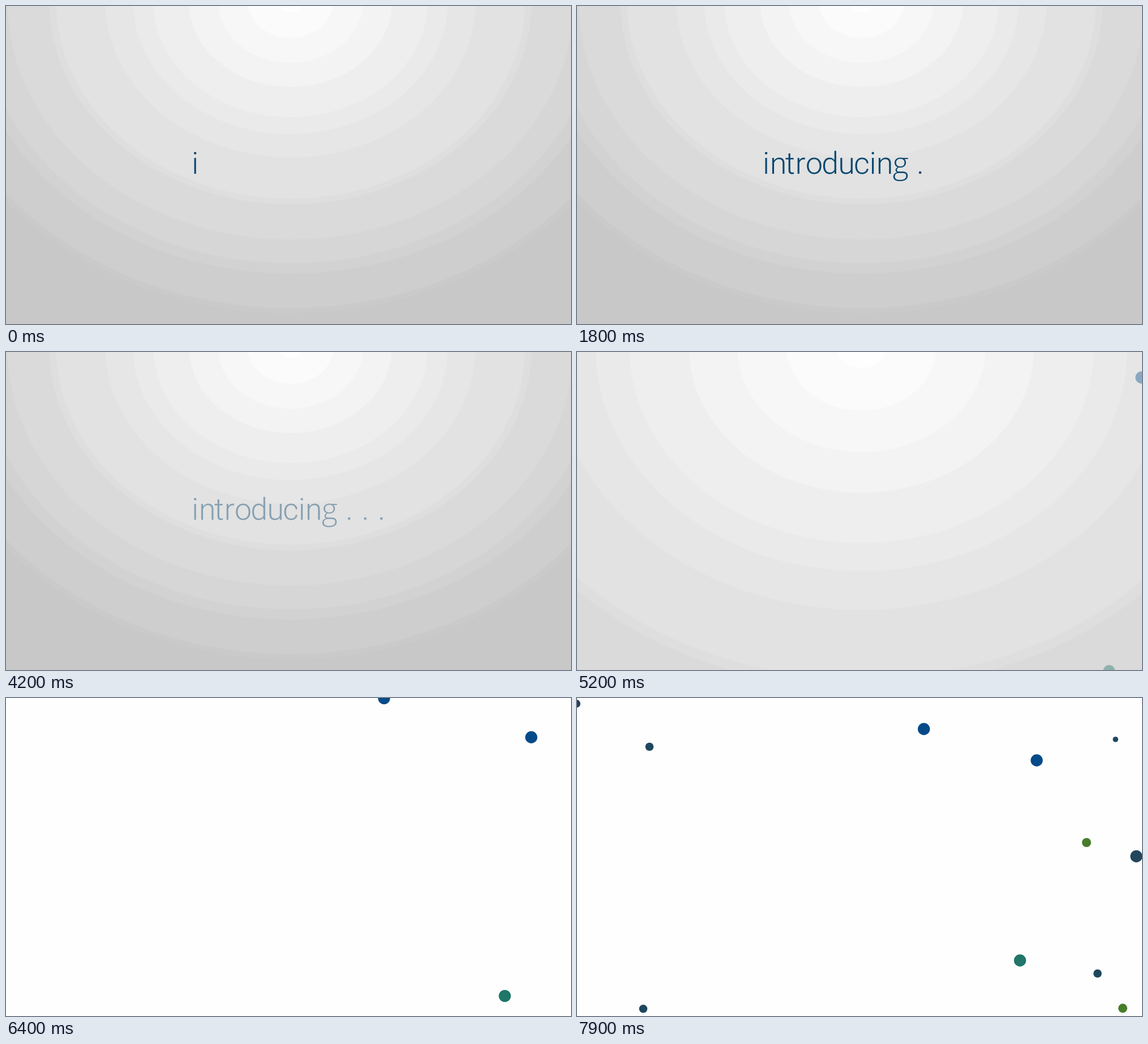
These frames come from a looping animation (998 by 561 pixels, 8 s). An HTML page:

```html
<!DOCTYPE html>
<html lang="en">
<head>
<meta charset="utf-8">
<title>Introducing</title>
<style>
html, body { margin: 0; width: 100%; height: 100%; overflow: hidden; background: #fefefe; }
svg { display: block; width: 998px; height: 561px; }
text { font: 300 54px Roboto, sans-serif; fill: #08466f; text-anchor: middle; }
text.loop { font-family: "Open Sans", sans-serif; }
</style>
</head>
<body>
<svg viewBox="0 0 998 561">
  <rect id="base" width="998" height="561" fill="#c8c8c8"/>
  <g id="bands"></g>
  <g id="title"></g>
  <g id="dots"></g>
</svg>
<script>
const LOOP = 8000, STEP = 100;
const byId = id => document.getElementById(id);

function add(parent, tag, attrs, content = '') {
  const el = document.createElementNS('http://www.w3.org/2000/svg', tag);
  for (const key in attrs) el.setAttribute(key, attrs[key]);
  el.textContent = content;
  parent.appendChild(el);
  return el;
}

// Lower edge and grey level of each backdrop band, outermost first
const bands = [
  [542, 202], [533, 206], [472, 210], [454, 214], [412, 218], [350, 222], [340, 226],
  [267, 230], [226, 234], [196, 238], [143, 243], [100, 247], [56, 251], [11, 254]
].map(([edge, grey]) => ({
  edge,
  el: add(byId('bands'), 'ellipse', { cx: 502.5, cy: -7.3, fill: `rgb(${grey},${grey},${grey})` })
}));

// Character, centre x, time of appearance
const letters = [
  ['i', 334, 0], ['n', 355.5, 200], ['t', 376.5, 300], ['r', 394.5, 500], ['o', 419, 600],
  ['d', 447, 800], ['u', 476, 900], ['c', 503, 1100], ['i', 522.5, 1200], ['n', 543.5, 1300],
  ['g', 571.5, 1500], ['.', 606.5, 1800], ['.', 635, 2100], ['.', 663.5, 2400]
].map(([char, x, start]) => ({
  start,
  el: add(byId('title'), 'text', { x, y: 295.5, class: char === 'g' ? 'loop' : '' }, char)
}));

// Position at the end of the loop, travel, radius, colour
const BLUE = '#054a88', TEAL = '#1f7669', NAVY = '#1e475f', GREEN = '#477d2b';
const dots = [
  [812, 110, -185, 65, 10.7, BLUE],
  [782.5, 463, -157.5, -100, 10.7, TEAL],
  [612.7, 54.8, -88, 87, 10.7, BLUE],
  [128, 86, 228, 95, 7.3, NAVY],
  [900, 255, -217, 41, 8, GREEN],
  [919.5, 486, -206, -114, 7.3, NAVY],
  [-1, 10, 250, 135, 7, '#263f5d'],
  [951.2, 73, -225, 100, 4.8, NAVY],
  [988, 279.3, -244, -5, 10.7, '#21465c'],
  [117, 548.3, 190, -135, 7.3, NAVY],
  [964, 547.3, -230, -135, 8, GREEN]
].map(([x, y, dx, dy, r, fill]) => ({ x, y, dx, dy, el: add(byId('dots'), 'circle', { r, fill }) }));

const ramp = (t, from, to) => Math.min(1, Math.max(0, (t - from) / (to - from)));

// Gently accelerating travel: 0 at 5.2 s, 1 at 7.9 s
function travel(t) {
  const u = (t - 5200) / 2700;
  return u * (0.667 + u * (0.439 - 0.106 * u));
}

function draw(t) {
  const fade = ramp(t, 4800, 5800);
  for (const { edge, el } of bands) {
    // Edges run outwards as the backdrop whitens
    const ry = (edge + 15) / Math.max(0.001, 1 - fade) - 7.7;
    el.setAttribute('ry', ry);
    el.setAttribute('rx', ry * 1.192);
  }
  byId('bands').style.display = fade < 1 ? '' : 'none';
  byId('base').setAttribute('fill', fade < 1 ? '#c8c8c8' : '#fefefe');

  for (const { start, el } of letters) el.style.display = t >= start ? '' : 'none';
  byId('title').style.opacity = 1 - ramp(t, 3350, 4800);

  const left = 1 - travel(t);
  for (const { x, y, dx, dy, el } of dots) {
    el.setAttribute('cx', x - dx * left);
    el.setAttribute('cy', y - dy * left);
  }
  byId('dots').style.opacity = fade;
}

const origin = performance.now();
function tick() {
  const t = (performance.now() - origin) % LOOP;
  draw(Math.floor(t / STEP) * STEP);
  requestAnimationFrame(tick);
}
tick();
</script>
</body>
</html>
```
